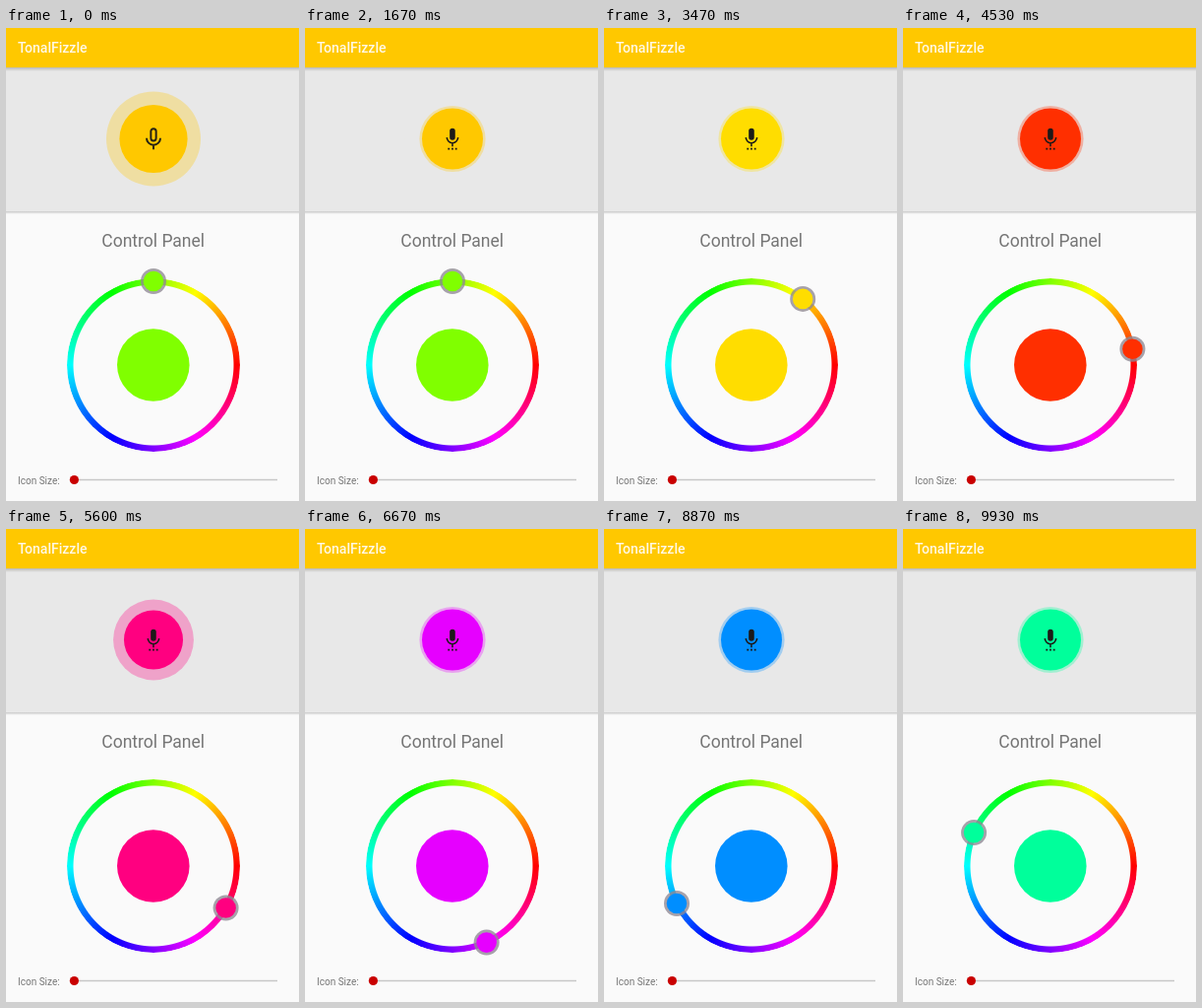
Recreate the animation shown at these times as an HTML page. Size 298x480 px, loop 9.99 s.

```html
<!DOCTYPE html>
<html lang="en">
<head>
<meta charset="utf-8">
<title>Voice button</title>
<style>
  html, body { margin: 0; width: 100%; height: 100%; overflow: hidden; background: #fafafa; }
  #stage { position: relative; width: 298px; height: 480px; overflow: hidden; }
  #wheel {
    position: absolute; left: 62px; top: 254px; width: 176px; height: 176px; border-radius: 50%;
    background: conic-gradient(from 30deg, #ff0, #f00, #f0f, #00f, #0ff, #0f0, #ff0);
    -webkit-mask: radial-gradient(circle, transparent 81px, #000 82px);
    mask: radial-gradient(circle, transparent 81px, #000 82px);
  }
  svg { position: absolute; left: 0; top: 0; }
  text { font-family: Roboto, sans-serif; }
</style>
</head>
<body>
<div id="stage">
  <div id="wheel"></div>
  <svg width="298" height="480" viewBox="0 0 298 480">
    <defs>
      <linearGradient id="shade" x2="0" y2="1">
        <stop stop-color="#000" stop-opacity=".2"/>
        <stop offset="1" stop-color="#000" stop-opacity="0"/>
      </linearGradient>
    </defs>
    <rect y="40" width="298" height="146" fill="#e8e8e8"/>
    <rect y="40" width="298" height="4" fill="url(#shade)"/>
    <rect y="186" width="298" height="3" fill="url(#shade)"/>
    <rect width="298" height="40" fill="#ffc800"/>
    <text x="12" y="24.5" font-size="14" font-weight="500" fill="#fff8e6">TonalFizzle</text>

    <circle id="ripple" cx="150" cy="112.5" opacity=".3"/>
    <circle id="button" cx="150" cy="112.5"/>
    <g id="idle" transform="translate(136.2 99) scale(1.15)" fill="none" stroke="#262214" stroke-width="1.7">
      <rect x="9.7" y="2.8" width="4.6" height="10.6" rx="2.3"/>
      <path d="M5.9 11a6.1 6.1 0 0 0 12.2 0M12 17v4"/>
    </g>
    <g id="live" transform="translate(138.8 101.7) scale(.93)" fill="#1c1a18">
      <rect x="9" y="0" width="6" height="13" rx="3"/>
      <path d="M5.9 10a6.1 6.1 0 0 0 12.2 0M12 16v4" fill="none" stroke="#1c1a18" stroke-width="1.7"/>
      <path d="M7 21.5h2v2h-2zM11 21.5h2v2h-2zM15 21.5h2v2h-2z"/>
    </g>

    <text x="149.7" y="222" font-size="17.5" text-anchor="middle" fill="#757575">Control Panel</text>
    <circle id="swatch" cx="149.8" cy="342" r="36.8"/>
    <g id="knob">
      <circle r="13" fill="#8e8894" fill-opacity=".78"/>
      <circle id="knobFill" r="10.3"/>
    </g>

    <text x="12" y="463" font-size="10" fill="#757575">Icon Size:</text>
    <path d="M74 458.5H276" stroke="#c6c6c6" stroke-width="1.5"/>
    <circle cx="69.4" cy="458.5" r="4.6" fill="#c90000"/>
  </svg>
</div>
<script>
const LOOP = 9990, FPS = 15;
const TAP = 800, PICK = 2300, SHOUT = 5570;
const $ = id => document.getElementById(id);

// Pace of the drag around the wheel: [ms, degrees]
const drag = [[PICK, 0], [3470, 38], [5600, 120], [7870, 196.5], [9930, 293.5]];

const clamp = v => Math.min(1, Math.max(0, v));
const ease = v => v * v * (3 - 2 * v);

function dragAngle(t) {
  return drag.slice(1).reduce((sum, [t1, a1], i) => {
    const [t0, a0] = drag[i];
    return sum + (a1 - a0) * clamp((t - t0) / (t1 - t0));
  }, 0);
}

function draw(t) {
  const angle = dragAngle(t);
  const rad = angle * Math.PI / 180;
  const x = 150 + 85 * Math.sin(rad), y = 342 - 85 * Math.cos(rad);
  const color = `hsl(${(450 - angle) % 360} 100% 50%)`;
  const buttonColor = t < PICK ? '#ffc800' : color;

  const rest = 1 - ease(clamp((t - TAP + 150) / 300));
  const voice = Math.exp(-(((t - SHOUT) / 160) ** 2));

  $('knob').setAttribute('transform', `translate(${x} ${y})`);
  for (const id of ['knobFill', 'swatch']) $(id).setAttribute('fill', color);
  for (const id of ['button', 'ripple']) $(id).setAttribute('fill', buttonColor);
  $('button').setAttribute('r', 31 + 3.6 * rest - voice);
  $('ripple').setAttribute('r', 33.6 + 14.4 * rest + 7.6 * voice);
  $('idle').style.display = t < TAP ? '' : 'none';
  $('live').style.display = t < TAP ? 'none' : '';
}

const start = performance.now();
function tick(now) {
  const t = Math.max(0, now - start) % LOOP;
  draw(Math.floor((t + 4) * FPS / 1000) * 1000 / FPS);
  requestAnimationFrame(tick);
}
draw(0);
requestAnimationFrame(tick);
</script>
</body>
</html>
```
